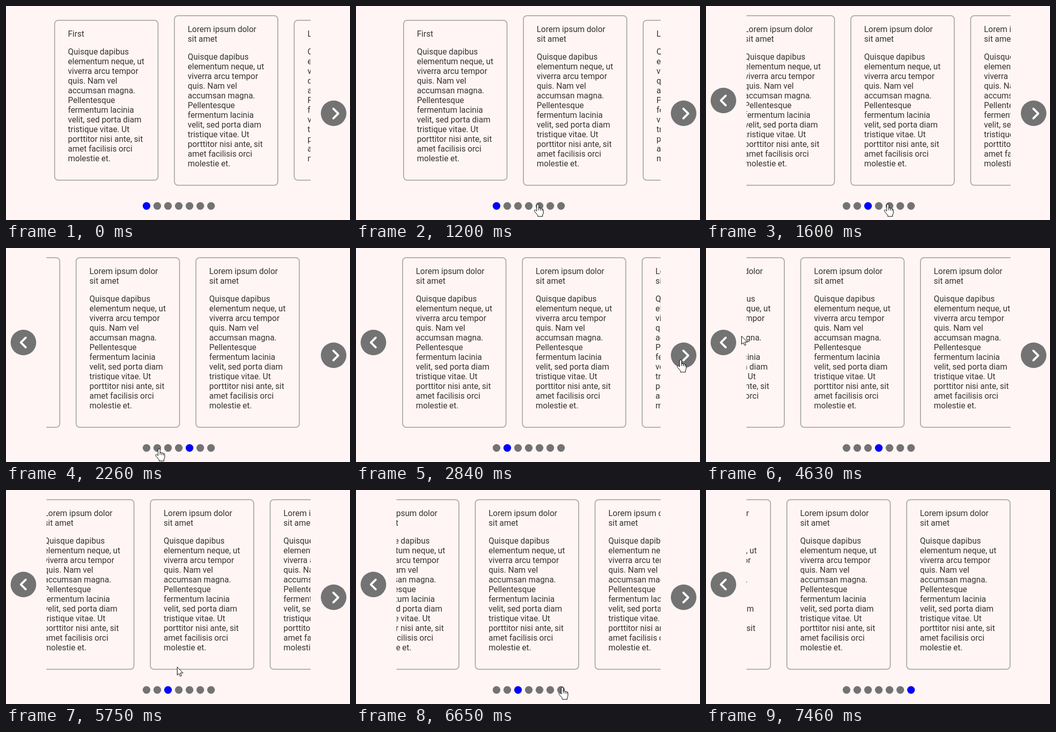
Animation, 672 px wide and 419 px high, one loop 7.59 s. Source, as an HTML page:

```html
<!DOCTYPE html>
<html lang="en">
<head>
<meta charset="utf-8">
<title>Card carousel</title>
<style>
  html, body { margin: 0; width: 100%; height: 100%; overflow: hidden; background: #fff5f4; }
  body { position: relative; font: 16px/19px Roboto, sans-serif; color: #333; }
  #view { position: absolute; left: 79px; top: 0; width: 516px; height: 370px; overflow: hidden; }
  .card {
    position: absolute; top: 18px; width: 204px; height: 334px; box-sizing: border-box;
    padding: 16px 25px 0; border: 2px solid #b3b0b0; border-radius: 8px;
  }
  .card.short { top: 27px; height: 315px; }
  .card p { margin: 0 0 16px; }
  .dot {
    position: absolute; top: 384px; width: 15px; height: 15px;
    border-radius: 50%; background: #737373;
  }
  .dot.on { background: #00f; }
  svg { position: absolute; left: 0; top: 0; overflow: visible; }
  .nav circle { fill: #737373; }
  .nav path { fill: none; stroke: #fff; stroke-width: 4; stroke-linecap: round; stroke-linejoin: round; }
  #cursor path { fill: #fff; stroke: #000; stroke-linejoin: round; }
</style>
</head>
<body>
<div id="view"><div id="track"></div></div>
<svg width="672" height="419">
  <g class="nav" id="prev" transform="translate(34 185)"><circle r="25"/><path d="M4.5 -9.5L-5 0L4.5 9.5"/></g>
  <g class="nav" id="next" transform="translate(640 210)"><circle r="25"/><path d="M-.5 -9L9 .5L-.5 10"/></g>
</svg>
<div id="dots"></div>
<svg width="672" height="419">
  <g id="cursor">
    <path id="arrow" d="M.5 .5V16.5L4 13.2L6.4 18.7L8.9 17.6L6.6 12.2H11.8Z"/>
    <path id="hand" d="M-2 2Q-2 0 0 0T2 2V8Q4 6.3 5.5 8.4Q7.7 7.3 8.8 9.4Q11 9 11 11.5V16Q11 19 9.5 21V24H0V21.5L-6 14.5Q-7.5 11 -4.5 11.3L-2 13.5ZM2 8V12M5.5 8.4V12.5M8.8 9.4V13"/>
  </g>
</svg>
<script>
const LOOP = 7590, PAGE = 516, PITCH = 234, CARDS = 15, PAGES = 7, LAG = 16;
const MAX = 15 + PITCH * (CARDS - 1) + 204 - PAGE;
const $ = id => document.getElementById(id);

const body = 'Quisque dapibus elementum neque, ut viverra arcu tempor quis. ' +
  'Nam vel accumsan magna. Pellentesque fermentum lacinia velit, sed porta diam ' +
  'tristique vitae. Ut porttitor nisi ante, sit amet facilisis orci molestie et.';
const shortTitles = { 0: 'First', 2: 'Lorem ipsum' };

function add(parent, className, left) {
  const el = document.createElement('div');
  el.className = className;
  el.style.left = left + 'px';
  return parent.appendChild(el);
}

for (let i = 0; i < CARDS; i++) {
  const title = shortTitles[i];
  const card = add($('track'), title ? 'card short' : 'card', 15 + PITCH * i);
  card.innerHTML = `<p>${title || 'Lorem ipsum dolor sit amet'}</p><p>${body}</p>`;
}
const dots = Array.from({ length: PAGES }, (_, i) => add($('dots'), 'dot', 267 + 21 * i));

const clicks = [
  { at: 1183, page: 4 }, { at: 2345, page: 1 }, { at: 3344, page: 2 },
  { at: 4250, page: 3 }, { at: 5530, page: 2 }, { at: 6660, page: 6 }
];

// Places where the pointer rests; it moves straight from one to the next.
const stops = [
  { from: 510, to: 510, x: 425, y: 422 },
  { from: 950, to: 1950, x: 355, y: 388 },
  { from: 2130, to: 2400, x: 299, y: 393 },
  { from: 2860, to: 4290, x: 648, y: 212 },
  { from: 4652, to: 5540, x: 33, y: 170 },
  { from: 5799, to: 6690, x: 403, y: 386 },
  { from: 6765, to: 6765, x: 408, y: 424 }
];

const mix = (a, b, k) => a + (b - a) * k;

// cubic-bezier(.42, 0, .58, 1)
function easeInOut(x) {
  let lo = 0, hi = 1;
  for (let i = 0; i < 24; i++) {
    const u = (lo + hi) / 2, v = 1 - u;
    if (1.26 * u * v * v + 1.74 * u * u * v + u * u * u < x) lo = u; else hi = u;
  }
  return lo * lo * (3 - 2 * lo);
}

// Smooth scrolling whose duration grows with the root of the distance.
function scrollAt(t) {
  let pos = 0;
  for (const { at, page } of clicks) {
    if (t < at) break;
    const target = Math.min(page * PAGE, MAX);
    const duration = Math.sqrt(Math.abs(target - pos)) / 60 * 1000;
    pos = mix(pos, target, easeInOut(Math.min(1, (t - at) / duration)));
  }
  return pos;
}

function pointerAt(t) {
  const i = stops.findIndex(s => s.from > t);
  if (i < 1) return null;
  const a = stops[i - 1], b = stops[i];
  const k = Math.max(0, (t - a.to) / (b.from - a.to));
  return [mix(a.x, b.x, k), mix(a.y, b.y, k)];
}

function overControl(x, y) {
  const inside = (cx, cy, r) => Math.hypot(x - cx, y - cy) <= r;
  return inside(34, 185, 25) || inside(640, 210, 25) ||
    dots.some((_, i) => inside(274.5 + 21 * i, 391.5, 7.5));
}

const show = (id, on) => { $(id).style.display = on ? '' : 'none'; };

function draw(t) {
  $('track').style.transform = `translateX(${-Math.round(scrollAt(t))}px)`;
  const active = Math.round(scrollAt(t - LAG) / PAGE);
  dots.forEach((dot, i) => dot.classList.toggle('on', i === active));
  show('prev', active > 0);
  show('next', active < PAGES - 1);

  const pointer = pointerAt(t);
  show('cursor', pointer);
  if (pointer) {
    const [x, y] = pointer.map(Math.round), over = overControl(x, y);
    $('cursor').setAttribute('transform', `translate(${x} ${y})`);
    show('hand', over);
    show('arrow', !over);
  }
}

const begin = performance.now();
function tick() {
  draw((performance.now() - begin) % LOOP);
  requestAnimationFrame(tick);
}
tick();
</script>
</body>
</html>
```
